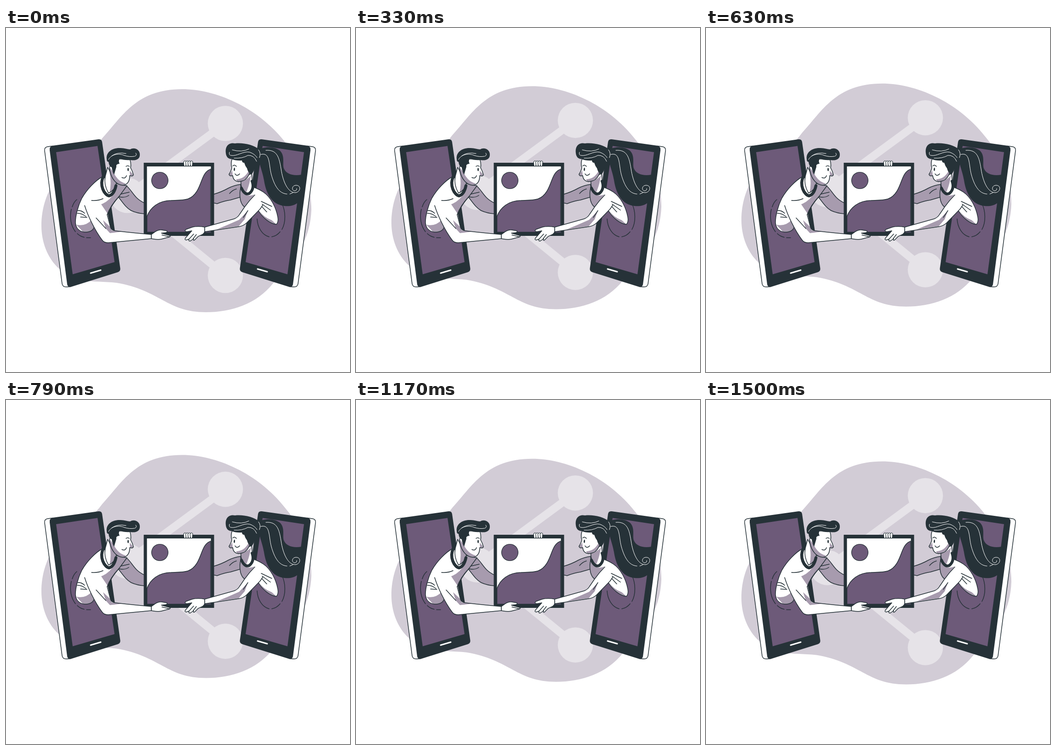
Write an HTML page with a canvas that moves like this. It is 748 px wide and 748 px high and loops after 1540 ms.

```html
<!DOCTYPE html>
<html lang="en">
<head>
<meta charset="utf-8">
<title>Sharing a picture</title>
<style>
html, body { margin: 0; width: 100%; height: 100%; overflow: hidden; background: #fff; }
canvas { display: block; }
</style>
</head>
<body>
<canvas id="stage" width="748" height="748"></canvas>
<script>
const ctx = document.getElementById('stage').getContext('2d');
const DARK = '#263238', PURPLE = '#6d5a79', SHADE = '#a79bae';
const BLOB = '#d2ccd6', PALE = '#e6e3e8', WHITE = '#fff';
const LOOP = 1540, STEPS = 37;

function shape(d, fill, stroke = DARK, width = 1.5) {
  const path = new Path2D(d);
  if (fill) { ctx.fillStyle = fill; ctx.fill(path); }
  if (stroke) { ctx.strokeStyle = stroke; ctx.lineWidth = width; ctx.stroke(path); }
}
const fill = (d, color) => shape(d, color, null);
const line = (d, color = DARK, width = 1.5) => shape(d, null, color, width);

// White outline with the shadow clipped to its inside.
function shaded(outline, shadow) {
  fill(outline, WHITE);
  ctx.save();
  ctx.clip(new Path2D(outline));
  fill(shadow, SHADE);
  ctx.restore();
  line(outline);
}

function disc(x, y, r, color) {
  ctx.fillStyle = color;
  ctx.beginPath();
  ctx.arc(x, y, r, 0, Math.PI * 2);
  ctx.fill();
}

// Vertical drift as [time, offset] pairs.
const DRIFT = [[0, 0], [715, -14.1], [790, -13.4], [1170, -5.2], [1500, 0.5], [1540, 0]];
function drift(t) {
  const i = DRIFT.findIndex(([time]) => time > t);
  const [t0, y0] = DRIFT[i - 1], [t1, y1] = DRIFT[i];
  return y0 + (y1 - y0) * (t - t0) / (t1 - t0);
}

function backdrop(y) {
  ctx.save();
  ctx.translate(0, y);
  fill('M383 133C456 133 547 172 606 247C650 299 664 345 664 395C662 450 640 496 580 556C545 600 490 618 435 618C350 618 335 570 240 554C185 548 150 558 115 523C90 500 77 465 77 430C77 392 88 362 103 337C125 300 175 287 209 240C252 194 282 133 383 133Z', BLOB);
  line('M477 207.5L264 364L477 538', PALE, 17);
  for (const [x, cy] of [[477, 207.5], [264, 364], [477, 538]]) disc(x, cy, 38.3, PALE);
  ctx.restore();
}

function phone() {
  shape('M102 256.5L91 258Q83 259 84 267L122 556Q123 563 131 563L140 562.5Z', WHITE);
  fill('M101 256L201 242Q208 241 209 248L248.500 523Q249 529 243 531L141 563Q134 564 133 557L95 266Q94 258 101 256Z', DARK);
  fill('M109 270L199 256.500L236 509L145 535.500Z', PURPLE);
}

function phones() {
  phone();
  ctx.save();
  ctx.translate(757, 0);
  ctx.scale(-1, 1);
  phone();
  ctx.restore();
  line('M184 533L206 526.500M547 524L568 530', WHITE, 3);
  line('M154 373Q147 379 144 389M142 394C138 412 141 430 151 443M155 447Q161 453 170 455M175 456L184 456');
  line('M600 382C608 398 609 422 600 438M596 443Q589 452 578 454M572 454C557 450 547 434 546 415');
}

function farArms() {
  shape('M253 343L263 344C270 350 276 361 284 369Q291 376 302 381L302 404Q285 403 272 397C260 390 253 378 244 367Z', SHADE);
  shape('M510 340Q496 342 484 348Q468 357 450 362L450 380L459 382Q474 376 488 374L512 367Z', SHADE);
  line('M246 367Q258 370 267 364M250 361L268 357M501 350Q493 352 486 360');
}

function picture() {
  fill('M299.500 293H452.500V452H299.500Z', DARK);
  fill('M306.500 301H445.500V444H306.500Z', WHITE);
  shape('M306.500 410C313 391 332 375 359 375C387 374 402 376 415 355C427 335 427 313 445 307V444H306.500Z', PURPLE);
  disc(334.5, 331.5, 18.6, DARK);
  disc(334.5, 331.5, 17.4, PURPLE);
  line('M434 444H445', PURPLE, 1);
  for (let i = 0; i < 4; i++) {
    const x = 387 + i * 4.7;
    shape(`M${x - 1} 292Q${x + 2} 286 ${x + 5} 291L${x + 4} 299Q${x + 2} 303 ${x} 299Z`, WHITE, DARK, 1.2);
  }
}

function man() {
  shaded('M210 323C194 332 176 351 165 370C157 386 151 407 151 423C152 436 160 443 172 444C185 444 192 438 192 429L220 408Q226 389 246 366L263 343L238 338Z',
    'M153 428Q174 432 187 416L200 437L172 448ZM200 386Q220 380 231 365L242 340L265 340L245 370L220 410Z');
  fill('M167 374C172 398 192 439 209 461Q213 467 222 467L316 458V449Q272 445 238 441Q229 440 227 433L221 404L202 376Z', WHITE);
  fill('M196 413L217 436L211 418L226 432L230 440L252 443L226 446Z', SHADE);
  line('M171 386C178 409 194 441 209 461Q213 467 222 467L316 458V449Q272 445 238 441Q229 440 227 433L220 406');
  line('M196 413L217 436M155 403Q164 402 174 410M156 397Q164 396 171 403M162 411L176 412M186 375Q201 376 211 371M220 406Q227 386 246 366');
  shaded('M221 303L216 322Q212 341 223 359Q237 353 240 337Z', 'M224 309Q232 330 242 333L239 347L224 362Q231 340 224 309Z');
  line('M212 322C202 342 214 363 224 365Q235 362 239 343', DARK, 6.5);

  shaded('M237 286L268 283Q273 293 271 304Q275 311 277 319Q277 323 269 321Q269 340 254 342C241 341 230 330 226 311Q222 298 237 286Z',
    'M226 304C237 316 240 333 260 338L254 344Q226 332 222 306ZM269 310L278 321L270 324Z');
  fill('M219 285C217 270 231 260 249 261C258 261 264 264 270 264C279 258 292 265 291 276C291 286 281 289 270 287Q257 288 247 284Q244 290 247 295Q238 296 240 302L235 319Q231 312 230 303Q224 301 223 291Q219 291 219 285Z', DARK);
  line('M223 286C229 274 246 272 257 277Q269 281 279 279M230 278Q242 269 261 273M280 279Q286 276 282 272', WHITE, 1);
  shape('M316 449C324 443 330 438 338 439L350 441Q352 444 347 445L338 446L355 451Q360 454 353 455L338 459C330 461 322 459 316 458Z', WHITE);
  line('M339 450L355 454M252 325Q259 329 262 321M261 301Q265 298 268 301');
  fill('M265 304Q267 304 267 308T265 311Q263 308 265 304Z', DARK);
}

function ponytail() {
  fill('M548 266C562 256 584 258 596 267C607 278 601 295 604 305C609 318 625 322 642 319C646 335 647 352 643 364C640 381 625 389 606 387C576 384 565 357 561 331C557 308 549 296 551 280Z', DARK);
  line('M554 275C575 269 571 297 577 319C584 344 594 360 611 361M617 361L624 358M565 266C590 264 594 282 598 306C602 334 613 359 630 358C641 356 642 342 631 342C622 342 620 352 627 354Q633 354 632 349', WHITE, 1);
}

function woman() {
  ponytail();
  shaded('M512 344Q506 357 510 375Q513 386 520 390L547 394C558 414 575 426 588 427Q593 421 591 411C587 390 576 368 560 357Q550 350 535 345Z',
    'M550 397Q561 412 578 418L590 429L567 423ZM508 340L513 356Q525 369 540 362L524 384L518 392L504 379Z');
  fill('M543 361Q530 374 519 389L508 405Q504 412 496 415L432 433V443L506 432Q515 431 523 424L553 393L563 370Z', WHITE);
  fill('M482 428L507 417L526 397L519 416L506 431L458 438Z', SHADE);
  line('M541 363Q529 375 519 389L508 405Q504 412 496 415L432 433V443L506 432Q515 431 523 424L553 393');
  line('M526 397L516 412M555 377L578 388M557 383L575 396M556 388L567 400M553 393L559 384');
  shaded('M511 328Q509 348 520 361Q536 357 536 341L534 316Z', 'M510 330Q526 331 533 320Q528 348 520 362L507 346Z');
  line('M535 333Q541 350 529 360Q519 364 512 348', DARK, 6);

  shaded('M492 284L530 286Q539 302 529 317Q523 333 506 334Q494 333 493 321Q485 323 485 318Q490 310 491 304Q488 294 492 284Z',
    'M531 302Q522 329 500 329L506 336L529 323ZM492 310L484 320L493 322Z');
  fill('M479 277C474 258 484 248 498 251C516 249 539 254 550 264C557 276 548 299 541 304Q539 313 533 319Q526 314 524 305Q520 300 518 293Q513 293 513 288Q500 289 491 285Q482 285 479 277Z', DARK);
  line('M489 277C502 280 515 267 530 270Q541 274 546 282M496 283Q514 284 526 277Q539 276 545 290M492 265Q513 271 528 263M488 277Q484 275 486 270M549 265Q555 272 551 282', WHITE, 1);
  line('M498 317Q502 324 508 317M493 300Q497 296 501 301');
  fill('M496 304Q498 303 498 307T496 311Q494 308 496 304Z', DARK);
  shape('M432 433C424 431 412 431 405 433L391 438Q387 442 393 443L404 441L390 457Q388 461 392 461L398 459Q396 464 401 463L408 458Q406 463 410 461L418 453C425 450 431 448 432 443Z', WHITE);
  line('M398 459L408 448M407 458L414 449');
}

function render(now) {
  const step = Math.floor((now % LOOP + 4) * STEPS / LOOP) % STEPS;
  ctx.fillStyle = WHITE;
  ctx.fillRect(0, 0, 748, 748);
  backdrop(drift(step * LOOP / STEPS));
  phones();
  farArms();
  picture();
  man();
  woman();
}

ctx.lineJoin = ctx.lineCap = 'round';
const start = performance.now();
function tick() {
  render(performance.now() - start);
  requestAnimationFrame(tick);
}
tick();
</script>
</body>
</html>
```
